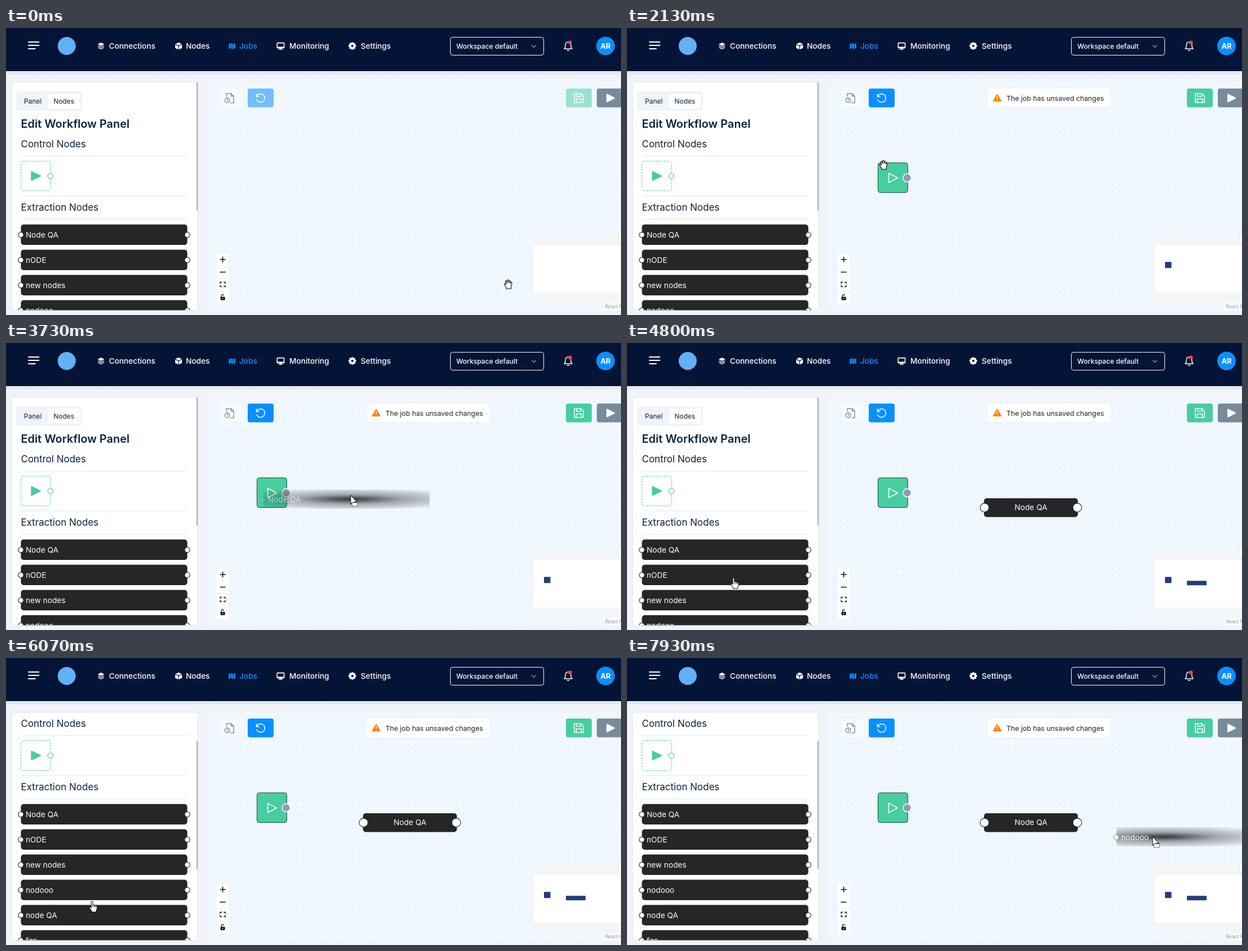
Recreate the animation shown at these times as an HTML page. Size 1094 px wide and 512 px high, loop 8 s.

```html
<!DOCTYPE html>
<html lang="en">
<head>
<meta charset="utf-8">
<title>Workflow editor</title>
<style>
  html, body { margin: 0; width: 100%; height: 100%; overflow: hidden; background: #f0f3f8; }
  svg { display: block; width: 1094px; height: 512px; }
  text { font-family: Inter, "Open Sans", sans-serif; white-space: pre; }
</style>
</head>
<body>
<svg id="stage" viewBox="0 0 1094 512"></svg>
<script>
const LOOP = 8000;
const GREEN = '#46cda0', BLUE = '#0a8fff', DARK = '#242628', NAVY = '#041437', INK = '#0b2239';

const rect = (x, y, w, h, fill, r = 0, more = '') =>
  `<rect x="${x}" y="${y}" width="${w}" height="${h}" rx="${r}" fill="${fill}" ${more}/>`;
const circle = (x, y, r, fill, more = '') =>
  `<circle cx="${x}" cy="${y}" r="${r}" fill="${fill}" ${more}/>`;
const path = (d, fill, stroke = 'none', w = 1, more = '') =>
  `<path d="${d}" fill="${fill}" stroke="${stroke}" stroke-width="${w}" stroke-linejoin="round" stroke-linecap="round" ${more}/>`;
const line = (d, stroke, w = 1) => path(d, 'none', stroke, w);
const text = (x, y, s, size, fill, weight = 400, anchor = 'start', more = '') =>
  `<text x="${x}" y="${y}" font-size="${size}" fill="${fill}" font-weight="${weight}" text-anchor="${anchor}" ${more}>${s}</text>`;
const group = (body, more = '') => `<g ${more}>${body}</g>`;
const at = (x, y, body) => group(body, `transform="translate(${x} ${y})"`);

// Header
const gearTeeth = [0, 45, 90, 135].map(a =>
  rect(-1.7, -6.8, 3.4, 13.6, '#fff', 1, `transform="rotate(${a})"`)).join('');
const icons = {
  layers: path('M-6 -3L0 -6L6 -3L0 0Z', '#fff') +
    path('M-6 0L-4.4 -.8L0 1.4L4.4 -.8L6 0L0 3Z', '#fff') +
    path('M-6 3L-4.4 2.2L0 4.4L4.4 2.2L6 3L0 6Z', '#fff'),
  cube: path('M-5.6 -3.6L0 -6.2L5.6 -3.6L0 -1Z', '#fff') +
    path('M-6 -2.4L-.6 .2V6.3L-6 3.7Z', '#fff') + path('M6 -2.4L.6 .2V6.3L6 3.7Z', '#fff'),
  map: path('M-5.8 -3.6L-2.6 -5V4L-5.8 5.4Z', BLUE) + path('M-1.7 -5L1.7 -3.6V5.4L-1.7 4Z', BLUE) +
    path('M2.6 -3.6L5.8 -5V4L2.6 5.4Z', BLUE),
  monitor: rect(-6.2, -5.4, 12.4, 9, 'none', 1, 'stroke="#fff" stroke-width="1.6"') +
    line('M-6 2.4H6M-2.6 6H2.6M0 3V6', '#fff', 1.7),
  gear: circle(0, 0, 5, '#fff') + gearTeeth + circle(0, 0, 2.1, NAVY)
};
const nav = [
  ['layers', 169, 183, 'Connections'], ['cube', 307, 320, 'Nodes'], ['map', 402, 415, 'Jobs'],
  ['monitor', 488.5, 504, 'Monitoring'], ['gear', 616, 631, 'Settings']
].map(([icon, ix, tx, label]) => at(ix, 32, icons[icon]) +
  text(tx, 37, label, 13.7, icon === 'map' ? BLUE : '#fff', 500)).join('');

const header =
  rect(0, 77, 1094, 8, 'url(#shade)') + rect(0, 0, 1094, 77, NAVY) + rect(0, 77, 1094, 1.2, '#fff') +
  line('M40 25H58.5M40 31H58.5M40 37H52', '#fff', 1.8) +
  circle(108, 32, 16, '#62b1f8') + nav +
  rect(790.5, 16.5, 166, 32, 'none', 4, 'stroke="#fff"') +
  text(801, 37, 'Workspace default', 12.1, '#fff', 500) +
  line('M935.5 31L939 34.5L942.5 31', '#8b96ad', 1.2) +
  at(1000, 32, line('M-7 5Q-4.8 3 -4.8 -1.5Q-4.8 -7 0 -7Q4.8 -7 4.8 -1.5Q4.8 3 7 5ZM-1.8 7.4Q0 9 1.8 7.4', '#fff', 1.4)) +
  circle(1003.3, 25.8, 3.3, '#fb4040') +
  circle(1066.5, 32, 16.5, BLUE) + text(1066.5, 36.6, 'AR', 13, '#fff', 700, 'middle');

// Side panel
const ring = (x, y, r, stroke) => circle(x, y, r, '#fff', `stroke="${stroke}" stroke-width="1.1"`);
const startTile = rect(26.5, 237.5, 53, 53, '#fff', 4, `stroke="${GREEN}" stroke-dasharray="3 2"`) +
  path('M45.5 256.5V271.5L61 264Z', GREEN, GREEN, 2.2) + ring(79, 264, 4.8, GREEN);
const bar = (y, label) => rect(26.5, y, 296, 36.5, DARK, 5) +
  ring(26.5, y + 18.5, 4.7, '#222') + ring(322.5, y + 18.5, 4.7, '#222') +
  text(35, y + 23, label, 13.7, '#fff');
const divider = y => rect(27, y, 295, 1, '#e3e6e9');

const panel = rect(10, 97, 331, 407, '#fff', 4, 'stroke="#e3e5e8"') +
  group(group(
    rect(18, 113, 117, 35, '#f0f3f8', 5) + rect(75, 117.5, 56.5, 26.5, '#fff', 4) +
    text(32, 135.3, 'Panel', 12, INK) + text(84.5, 135.3, 'Nodes', 12, INK) +
    text(26.5, 178, 'Edit Workflow Panel', 20, INK, 600) +
    text(26.5, 213, 'Control Nodes', 17, INK) + divider(228) + startTile + divider(299) +
    text(26.5, 326.3, 'Extraction Nodes', 17, INK) + divider(341) +
    ['Node QA', 'nODE', 'new nodes', 'nodooo', 'node QA', 'fgs'].map((s, i) => bar(350.5 + 45 * i, s)).join(''),
    'id="list"'), 'clip-path="url(#panelClip)"') +
  rect(338.7, 97, 2.6, 229, '#b6b9bc', 1.2, 'id="thumb"');

// Canvas
const undoButton = rect(430, 108, 46, 33.5, BLUE, 4) +
  at(453, 125, line('M-7.5 -7V-2.5H-3M-7 -3Q-4.5 -7.5 .5 -7.5A7.5 7.5 0 1 1 -7 3', '#fff', 1.6));
const saveButton = rect(996, 108, 46, 33.5, GREEN, 4) +
  at(1019, 125, line('M-8 -8H4L8 -4V8H-8ZM-4 -8V-3H3.5V-8M-4.5 8V1.5H4.5V8', '#fff', 1.5));
const historyButton = rect(381, 108, 40, 33.5, '#fff', 4, 'opacity=".5"') +
  at(397, 125, line('M-5 -3V-8H3.5L8 -3.5V8.5H3M3.5 -8V-3.5H8', '#838b93', 1.4) +
    circle(-3.5, 4, 4.3, 'none', 'stroke="#838b93" stroke-width="1.4"') + line('M-3.5 1.7V4L-2 5', '#838b93', 1.2));
const controls = rect(374, 402, 23, 90, '#fff', 1, 'stroke="#e8ecf0" stroke-width=".6"') +
  [424, 446.5, 469].map(y => rect(374, y, 23, .8, '#e9ecef')).join('') +
  line('M381 413H390M385.5 408.5V417.5M381 435.5H390', '#111', 1.6) +
  at(385.5, 457.5, line('M-4.5 -1.8V-4H-2M2 -4H4.5V-1.8M4.5 1.8V4H2M-2 4H-4.5V1.8', '#111', 1.4)) +
  rect(381.5, 479.5, 8, 6, '#111', 1) + line('M383.3 479V477.4A2.1 2.1 0 0 1 387.2 476.6', '#111', 1.3) +
  circle(385.5, 482.4, 1, '#fff');
const minimap = rect(936, 368, 158, 122, '#f4f5f6') + rect(939, 387, 155, 85, '#fff');

const warning = group(
  rect(642, 108, 217, 33, '#fff', 4) +
  path('M658.5 118.8L665 130H652Z', '#fb8500', '#fb8500', 2) +
  rect(657.8, 121.5, 1.5, 4.4, '#fff') + rect(657.8, 127.3, 1.5, 1.5, '#fff') +
  text(675, 129.5, 'The job has unsaved changes', 12.3, '#1d2126') +
  rect(957, 417.3, 11.5, 11, '#253b7c', 1) +
  rect(446.5, 240.5, 53, 53, GREEN, 4, 'stroke="#1f4a3d"') +
  path('M465.5 259V276L481.5 267.5Z', 'none', '#fff', 1.6) +
  circle(498.3, 267.3, 7.2, '#919cb4', 'stroke="#fff" stroke-width="1.5"'), 'id="started"');
const placed = group(
  rect(996, 424.3, 35, 8, '#253b7c', 1) + rect(635, 277, 167, 33.5, DARK, 5) +
  ring(636, 293.7, 7.8, '#222') + ring(801, 293.7, 7.8, '#222') +
  text(718.5, 298.3, 'Node QA', 13.7, '#fff', 400, 'middle'), 'id="placed"');

const pane = rect(360, 97, 734, 407, '#f0f7fe') + rect(360, 97, 734, 407, 'url(#dots)') +
  historyButton + group(undoButton, 'id="undo"') + group(saveButton, 'id="save"') +
  rect(1051, 108, 60, 33.5, '#788b9a', 4) + path('M1069 118.5V131.5L1082 125Z', '#fff', '#fff', 2) +
  controls + minimap + circle(1105.5, 374, 17, '#e4e7ea') + circle(1105.5, 374, 15.8, '#fff') +
  rect(1062, 490, 32, 14, '#fff', 0, 'opacity=".6"') + text(1065.5, 500, 'React Flow', 8.5, '#9a9a9a') +
  warning + placed;

// Drag images are drawn at their source spot and then moved by the drag offset.
const fadedBar = (id, y, label, ink, ringInk) => group(
  rect(26.5, y, 296, 34, `url(#${id}Fade)`, 4) +
  circle(26.5, y + 18, 4.7, '#fff', `stroke="#555" stroke-width=".8" opacity="${ringInk}"`) +
  text(35, y + 22.8, label, 13.7, '#fff', 400, 'start', `opacity="${ink}"`), `id="${id}"`);
const fade = (id, x, y) =>
  `<radialGradient id="${id}Fade" gradientUnits="userSpaceOnUse" cx="0" cy="0" r="1"
    gradientTransform="translate(${x} ${y}) scale(228 21)">` +
  [[0, .85], [.15, .68], [.4, .36], [1, 0]].map(([o, a]) =>
    `<stop offset="${o}" stop-color="#16181a" stop-opacity="${a}"/>`).join('') + '</radialGradient>';
const ghosts = group(startTile.replace('fill="#fff"', 'fill="none"'), 'id="ghostStart" opacity=".75"') +
  fadedBar('ghostQa', 350.5, 'Node QA', .6, .1) + fadedBar('ghostNodo', 395.5, 'nodooo', .95, .8);

// Cursors, each with its hotspot at 0,0
const arrow = path('M0 0V15.3L3.6 12.2L6 18L8.3 17L5.9 11.4H11Z', '#fff', '#000', 1);
const cursors = {
  arrow,
  move: arrow + rect(2.5, 12.5, 9.5, 6.5, '#fff', 0, 'stroke="#000" stroke-dasharray="1.2 1"'),
  hand: path('M-2 1.5Q-2 0 -.5 0T1 1.5V7L2 6.6Q3.5 6.4 3.8 7.4Q5.5 6.7 6.2 8Q8.2 7.6 8.4 9.6V13Q8.2 15 7 16.5V19H-1.5V17L-5 11.5Q-5.5 9.5 -3.5 10L-2 11.5Z', '#fff', '#000', 1) +
    line('M1 7V10M3.8 7.6V10.3M6.2 8.4V10.6', '#000', .9),
  grab: path('M-3 8V6L-6.6 .8Q-7 -1.2 -5 -1L-3.6 .6L-4.6 -4.4Q-4.4 -6.4 -2.7 -5.6L-1.6 -2V-6.6Q-.2 -8.6 1.2 -6.6V-2.2L2.3 -5.8Q4 -6.8 4.5 -5L4 -1.4L5.2 -3.2Q7 -3.8 7 -1.8L5.4 4.4V8Z', '#fff', '#000', 1.1),
  no: circle(0, 0, 6.4, 'none', 'stroke="#fff" stroke-width="4.2"') + line('M-4.3 -4.3L4.3 4.3', '#fff', 4) +
    circle(0, 0, 6.4, 'none', 'stroke="#000" stroke-width="2.2"') + line('M-4.3 -4.3L4.3 4.3', '#000', 2.2)
};

const stage = document.getElementById('stage');
stage.innerHTML = `<defs>
  <linearGradient id="shade" x2="0" y2="1"><stop stop-color="#d9dee5"/><stop offset="1" stop-color="#f0f3f8"/></linearGradient>
  <pattern id="dots" x="362" y="99" width="12.4" height="12.4" patternUnits="userSpaceOnUse">${circle(6.2, 6.2, .75, '#c3d6e8')}</pattern>
  <clipPath id="panelClip">${rect(10, 97, 331, 406.5, '#000', 4)}</clipPath>
  ${fade('ghostQa', 182, 367.5)}${fade('ghostNodo', 110, 412.5)}</defs>` +
  header + pane + panel + ghosts +
  group(Object.entries(cursors).map(([k, body]) => group(body, `id="${k}"`)).join(''), 'id="cursor"');

const el = id => document.getElementById(id);
const show = (id, on) => el(id).setAttribute('display', on ? 'inline' : 'none');
const move = (id, x, y) => el(id).setAttribute('transform', `translate(${x.toFixed(2)} ${y.toFixed(2)})`);

// time, x, y, cursor kind from that time on
const pointer = [
  [0, 893, 457, 'grab'], [70, 690, 400], [130, 400, 330], [200, 285, 304, 'arrow'], [330, 285, 304],
  [600, 180, 268], [800, 66, 238, 'hand'], [930, 61, 240], [1200, 72, 256],
  [1270, 80, 256, 'no'], [1330, 285, 254], [1600, 385, 246, 'move'], [1870, 448, 243], [2070, 456, 244],
  [2130, 456, 244, 'grab'], [2330, 340, 290, 'arrow'], [2530, 180, 352, 'hand'], [2670, 130, 358],
  [2930, 182, 361], [3130, 182, 361, 'no'], [3200, 262, 348], [3400, 430, 312, 'move'],
  [3670, 605, 270], [3930, 640, 279], [4000, 640, 279, 'grab'], [4330, 632, 275], [4400, 632, 275],
  [4600, 370, 345, 'arrow'], [4670, 280, 380, 'hand'], [4800, 190, 419], [5930, 190, 419],
  [6330, 86, 462], [6400, 86, 462], [6600, 91, 412.5], [6670, 91, 412.5, 'no'],
  [6800, 270, 408], [6930, 480, 402, 'move'], [7130, 676, 397], [7200, 690, 403],
  [7270, 673, 410], [7330, 672, 409], [7600, 790, 368], [7930, 935, 319]
];
const scroll = [[0, 0], [5000, 0], [5270, 45], [5470, 71.5], [5670, 84], [5870, 90]];
// id, first time, end time, grab point
const drags = [
  ['ghostStart', 1330, 2130, 72, 256],
  ['ghostQa', 3200, 4000, 182, 361],
  ['ghostNodo', 6730, LOOP, 91, 412.5]
];

function sample(keys, t) {
  let i = keys.length - 1;
  while (i && keys[i][0] > t) i--;
  const a = keys[i], b = keys[i + 1] || a;
  const p = a === b ? 0 : (t - a[0]) / (b[0] - a[0]);
  return a.slice(1, 3).map((v, n) => v + (b[n + 1] - v) * p);
}
const kindAt = t => pointer.filter(k => k[0] <= t && k[3]).pop()[3];

function draw(ms) {
  const t = Math.round(Math.floor(ms * .015 + .06) * 20 / 3) * 10;
  const [x, y] = sample(pointer, t), kind = kindAt(t);
  move('cursor', x, y);
  for (const k in cursors) show(k, k === kind);
  for (const [id, from, to, gx, gy] of drags) {
    show(id, t >= from && t < to);
    move(id, x - gx, y - gy);
  }
  const [top] = sample(scroll, t), ready = t >= 2130;
  move('list', 0, -top);
  move('thumb', 0, top * .56);
  el('undo').setAttribute('opacity', ready ? 1 : .55);
  el('save').setAttribute('opacity', ready ? 1 : .5);
  show('started', ready);
  show('placed', t >= 4000);
}

const begin = performance.now();
function tick() {
  draw((performance.now() - begin) % LOOP);
  requestAnimationFrame(tick);
}
tick();
</script>
</body>
</html>
```
